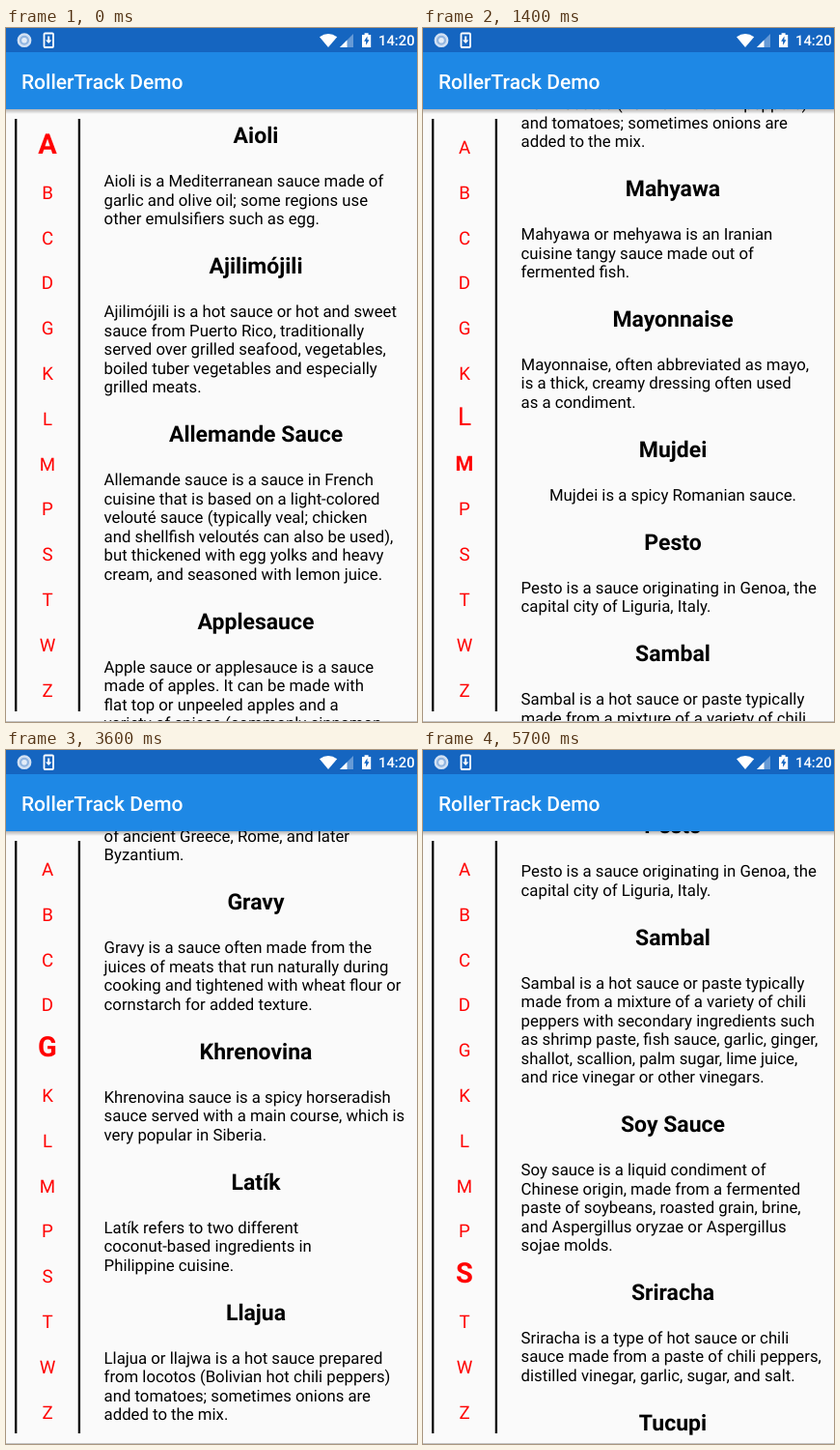
An HTML page for the animation above (5.8 s loop, 426x718 px).

```html
<!DOCTYPE html>
<html lang="en">
<head>
<meta charset="utf-8">
<title>RollerTrack Demo</title>
<style>
  html, body { margin: 0; width: 100%; height: 100%; overflow: hidden; background: #fafafa; }
  svg { display: block; font-family: Roboto, sans-serif; text-rendering: geometricPrecision; }
  .title { font-size: 23px; font-weight: 700; text-anchor: middle; }
  .body { font-size: 16.76px; }
  .letter { fill: #f00; text-anchor: middle; }
</style>
</head>
<body>
<svg id="stage" width="426" height="718" viewBox="0 0 426 718">
  <defs>
    <linearGradient id="shade" x2="0" y2="1">
      <stop stop-color="#000" stop-opacity=".28"/>
      <stop offset="1" stop-color="#000" stop-opacity="0"/>
    </linearGradient>
    <clipPath id="listArea"><path d="M86 84H426V718H86z"/></clipPath>
  </defs>
  <rect width="426" height="718" fill="#fafafa"/>
  <g id="list"></g>
  <ellipse id="glow" cx="205" rx="408" fill="#1e88e5" clip-path="url(#listArea)"/>
  <path d="M0 717.5H426" stroke="#c4c4c4"/>
  <path d="M10.2 94V707M75.9 94V707" stroke="#000" stroke-width="2.3"/>
  <g id="letters"></g>

  <rect y="84" width="426" height="5" fill="url(#shade)"/>
  <rect width="426" height="84" fill="#1e88e5"/>
  <rect width="426" height="25" fill="#1565c0"/>
  <text x="16" y="63" font-size="21" font-weight="500" fill="#fff">RollerTrack Demo</text>
  <g fill="#fff">
    <circle cx="19" cy="12.7" r="6.2" fill="#90b4e0" stroke="#d3e1f3" stroke-width="2.4"/>
    <circle cx="19" cy="12.7" r="2.8" fill="#e4edf8"/>
    <rect x="39.5" y="5.5" width="9.5" height="14.5" rx="1" fill="none" stroke="#fff" stroke-width="1.8"/>
    <path d="M43.2 8.5h2v4h2.2l-3.2 3.6-3.2-3.6h2.2z"/>
    <path d="M325 9.2Q334 3 343.2 9.2L334 20z"/>
    <path d="M360 6V20H346z" opacity=".35"/>
    <path d="M353.5 12.5V20H346z"/>
    <path d="M369 7h2.6V5.2h4V7h2.6V20H369z"/>
    <path d="M374.5 8.5l-3.4 5.2h2v4l3.4-5.4h-2z" fill="#1565c0"/>
    <text x="386" y="18" font-size="14.8" font-weight="500">14:20</text>
  </g>
</svg>
<script>
const sauces = `Aioli
Aioli is a Mediterranean sauce made of
garlic and olive oil; some regions use
other emulsifiers such as egg.

Ajilimójili
Ajilimójili is a hot sauce or hot and sweet
sauce from Puerto Rico, traditionally
served over grilled seafood, vegetables,
boiled tuber vegetables and especially
grilled meats.

Allemande Sauce
Allemande sauce is a sauce in French
cuisine that is based on a light-colored
velouté sauce (typically veal; chicken
and shellfish veloutés can also be used),
but thickened with egg yolks and heavy
cream, and seasoned with lemon juice.

Applesauce
Apple sauce or applesauce is a sauce
made of apples. It can be made with
flat top or unpeeled apples and a
variety of spices (commonly cinnamon
and allspice).

Bolognese
Bolognese sauce is a meat-based sauce
originating from Bologna.

Béchamel
Béchamel sauce, also known as white
sauce, is made from a white roux (butter
and flour) and milk.

Caruso Sauce
Caruso Sauce or Salsa Caruso is a warm
sauce made of cream, ham, cheese, nuts
and mushrooms.

Cebolada
Cebolada is a Portuguese onion stew,
onion sauce or paste that is prepared with
onion as a primary ingredient.

Chimichurri
Chimichurri is an uncooked sauce used
for grilled meat, made of parsley, garlic,
oregano, olive oil and vinegar.

Demi-glace
Demi-glace is a rich brown sauce in
French cuisine used by itself or as a
base for other sauces.

Garum
Garum is a fermented fish sauce that
was used as a condiment in the cuisines
of ancient Greece, Rome, and later
Byzantium.

Gravy
Gravy is a sauce often made from the
juices of meats that run naturally during
cooking and tightened with wheat flour or
cornstarch for added texture.

Khrenovina
Khrenovina sauce is a spicy horseradish
sauce served with a main course, which is
very popular in Siberia.

Latík
Latík refers to two different
coconut-based ingredients in
Philippine cuisine.

Llajua
Llajua or llajwa is a hot sauce prepared
from locotos (Bolivian hot chili peppers)
and tomatoes; sometimes onions are
added to the mix.

Mahyawa
Mahyawa or mehyawa is an Iranian
cuisine tangy sauce made out of
fermented fish.

Mayonnaise
Mayonnaise, often abbreviated as mayo,
is a thick, creamy dressing often used
as a condiment.

Mujdei
Mujdei is a spicy Romanian sauce.

Pesto
Pesto is a sauce originating in Genoa, the
capital city of Liguria, Italy.

Sambal
Sambal is a hot sauce or paste typically
made from a mixture of a variety of chili
peppers with secondary ingredients such
as shrimp paste, fish sauce, garlic, ginger,
shallot, scallion, palm sugar, lime juice,
and rice vinegar or other vinegars.

Soy Sauce
Soy sauce is a liquid condiment of
Chinese origin, made from a fermented
paste of soybeans, roasted grain, brine,
and Aspergillus oryzae or Aspergillus
sojae molds.

Sriracha
Sriracha is a type of hot sauce or chili
sauce made from a paste of chili peppers,
distilled vinegar, garlic, sugar, and salt.

Tucupi
Tucupi is a yellow sauce extracted
from wild manioc root in Brazil's
Amazon jungle.

Tzatziki
Tzatziki is made of salted strained yogurt
(usually from sheep or goat milk) or
diluted yogurt mixed with cucumbers,
garlic, salt, olive oil, sometimes with
vinegar or lemon juice, and some herbs
like dill, mint, parsley, thyme etc.

Worcestershire Sauce
Worcestershire sauce, frequently
shortened to Worcester sauce, is
a fermented liquid condiment of
complex mixture

Zhug
Zhug is a Middle Eastern hot sauce
originating in Yemeni cuisine.`;

const LOOP = 5800, LINE = 19.5, ITEM_GAP = 76.4, POP = 60;
const $ = id => document.getElementById(id);
const list = $('list'), glow = $('glow');

function addText(parent, cls, x, y, content) {
  const el = document.createElementNS('http://www.w3.org/2000/svg', 'text');
  el.setAttribute('class', cls);
  el.setAttribute('x', x);
  el.setAttribute('y', y);
  el.textContent = content;
  return parent.appendChild(el);
}

let baseline = 120.4;
for (const block of sauces.split('\n\n')) {
  const [title, ...lines] = block.split('\n');
  addText(list, 'title', 259, baseline, title);
  lines.forEach((line, i) => {
    const el = addText(list, 'body', 101.6, baseline + 45 + i * LINE, line);
    if (lines.length === 1) {
      el.setAttribute('x', 259);
      el.setAttribute('text-anchor', 'middle');
    }
  });
  baseline += ITEM_GAP + lines.length * LINE;
}

const letters = {};
[...'ABCDGKLMPSTWZ'].forEach((c, i) => {
  letters[c] = addText($('letters'), 'letter', 43, 130 + i * 46.8, c);
});

// Letters touched on the track, and when.
const picks = 'ABCDGKLMPSTWZWTSPMLKGPS';
const pickTimes = [-100, 590, 750, 880, 1010, 1140, 1270, 1385, 1500, 1620, 1740, 1860, 1970,
  2450, 2570, 2700, 2830, 2960, 3090, 3220, 3350, 4735, 5380];

const scrollKeys = [[0, 0], [600, 554.6], [1400, 2143.3], [1900, 3146.8], [2100, 3146.8],
  [3300, 1710], [3600, 1575.4], [4000, 1573.4], [4800, 1573.4], [5300, 2400], [5500, 2560], [5700, 2598.8]];
const glowKeys = [[1850, 0], [2000, 1], [2400, 0]];

const clamp = v => Math.max(0, Math.min(1, v));

function sample(keys, t) {
  let value = keys[0][1];
  for (let i = 1; i < keys.length; i++) {
    const [t0, v0] = keys[i - 1], [t1, v1] = keys[i];
    if (t >= t0) value = v0 + (v1 - v0) * clamp((t - t0) / (t1 - t0));
  }
  return value;
}

function draw(t) {
  list.setAttribute('transform', `translate(0 ${-sample(scrollKeys, t)})`);

  const g = sample(glowKeys, t);
  glow.setAttribute('ry', 143 * g);
  glow.setAttribute('cy', 718 + 84 * g);
  glow.setAttribute('opacity', 0.27 * g);

  const n = pickTimes.findLastIndex(start => t >= start);
  const grown = clamp((t - pickTimes[n]) / POP);
  for (const c in letters) {
    const scale = c === picks[n] ? grown : c === picks[n - 1] ? 1 - grown : 0;
    letters[c].setAttribute('font-size', 18.7 + 10.3 * scale);
    letters[c].setAttribute('font-weight', c === picks[n] ? 700 : 400);
  }
}

const begin = performance.now();
function tick() {
  draw((performance.now() - begin) % LOOP);
  requestAnimationFrame(tick);
}
tick();
</script>
</body>
</html>
```
